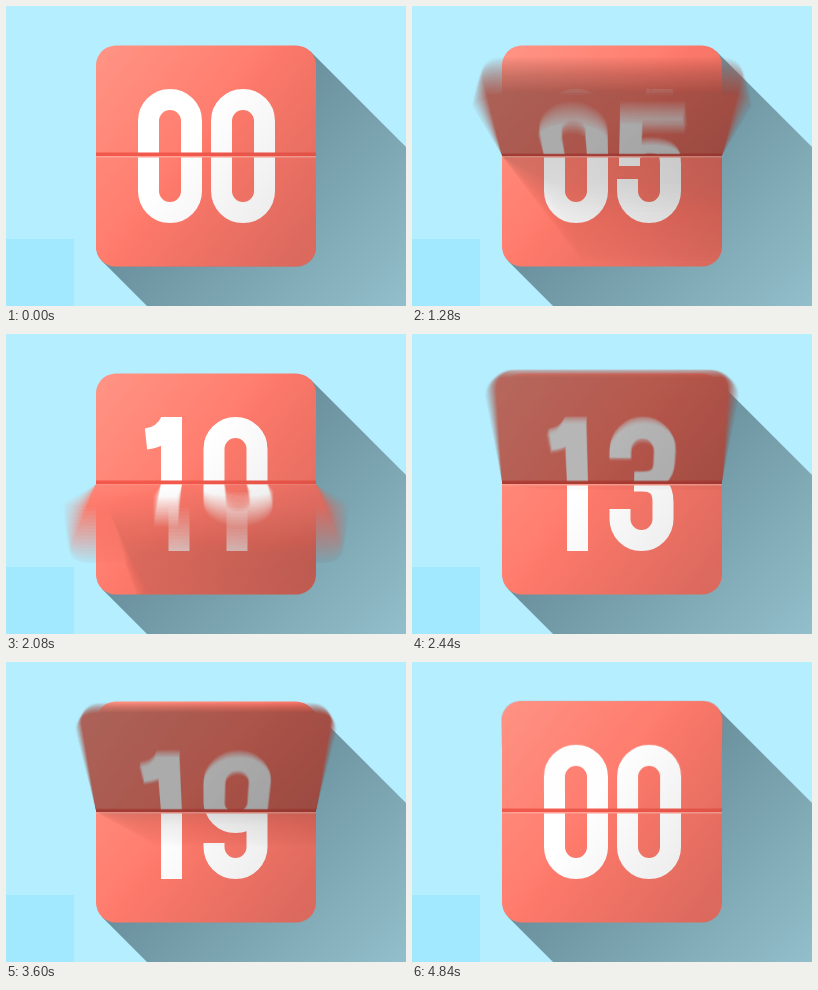
These frames come from a looping animation (400x300 px, 4920 ms). An HTML page with a canvas:

```html
<!DOCTYPE html>
<html lang="en">
<head>
<meta charset="utf-8">
<title>Flip counter</title>
<style>
  html, body { margin: 0; height: 100%; overflow: hidden; background: #b5eefe; }
  canvas { display: block; width: 400px; height: 300px; }
</style>
</head>
<body>
<canvas id="stage" width="400" height="300"></canvas>
<script>
const LOOP = 4920, STEP = 40, COUNT = 21;
const SHUTTER = 20, SAMPLES = 18;
const HINGE = 150, HALF = 110.5, LEFT = 90, WIDTH = 220;
const PERSPECTIVE = 0.27 / HALF;

// Stroked numerals in a 64 x 134 box, line width 21
const DIGITS = [
  'M10.5 32a21.5 21.5 0 0 1 43 0v70a21.5 21.5 0 0 1-43 0z',
  'M27.5 134V0M2 22Q20 20 27 4',
  'M10.5 42V32a21.5 21.5 0 0 1 43 0c0 34-43 44-43 91.5H62',
  'M10.5 40v-8a21.5 21.5 0 0 1 43 0v12q0 20-20 20h-9M25 64h8q20.5 0 20.5 21v17a21.5 21.5 0 0 1-43 0v-10',
  'M45.5 134V0M40 3L11 88v11.5h55',
  'M60 10.5H12.5V77M14 66q4-14 18-14q21.5 0 21.5 23v27a21.5 21.5 0 0 1-43 0v-12',
  'M53.5 36v-4a21.5 21.5 0 0 0-43 0v70a21.5 21.5 0 0 0 43 0v-24a21.5 21.5 0 0 0-43 0',
  'M1 10.5H51.5L26 134',
  'M12 32a20 21.5 0 0 1 40 0v12a20 20 0 0 1-40 0zM10.5 86a21.5 22 0 0 1 43 0v16a21.5 21.5 0 0 1-43 0z',
  'M10.5 98v4a21.5 21.5 0 0 0 43 0v-70a21.5 21.5 0 0 0-43 0v24a21.5 21.5 0 0 0 43 0'
].map(d => new Path2D(d));

function layer(paint) {
  const canvas = document.createElement('canvas');
  canvas.width = 400;
  canvas.height = 300;
  const g = canvas.getContext('2d');
  if (paint) paint(g);
  return g;
}

function gradient(g, x0, y0, x1, y1, ...colors) {
  const fill = g.createLinearGradient(x0, y0, x1, y1);
  colors.forEach((c, i) => fill.addColorStop(i / (colors.length - 1), c));
  return fill;
}

function cardPath(g) {
  g.beginPath();
  g.roundRect(LEFT, HINGE - HALF, WIDTH, 2 * HALF, 20);
}

const backdrop = layer(g => {
  g.fillStyle = '#b5eefe';
  g.fillRect(0, 0, 400, 300);
  g.fillStyle = gradient(g, 185, 185, 350, 350, '#6b929e', '#92bfcb');
  g.beginPath();
  for (const [x, y] of [[304, 45], [403, 144], [403, 303], [144, 303], [96, 255]]) g.lineTo(x, y);
  g.fill();
  g.fillStyle = '#a2e8fe';
  g.fillRect(0, 233, 68, 67);
}).canvas;

const faces = Array.from({ length: COUNT }, (_, n) => layer(g => {
  cardPath(g);
  g.clip();
  g.fillStyle = gradient(g, 95, 55, 310, 225, '#ff9283', '#ff7a6b', '#f47568');
  g.fillRect(0, 0, 400, 300);

  const digits = [Math.floor(n / 10), n % 10];
  const cell = d => d === 1 ? 58 : 73;
  let x = 200.5 - (cell(digits[0]) + cell(digits[1])) / 2;
  g.strokeStyle = '#fff';
  g.lineWidth = 21;
  for (const d of digits) {
    g.save();
    g.translate(x + (d === 1 ? 3 : 4.5), 83);
    g.stroke(DIGITS[d]);
    g.restore();
    x += cell(d);
  }
  g.fillStyle = '#f2584c';
  g.fillRect(LEFT, 146.5, WIDTH, 3.5);
  g.fillStyle = '#ffa194';
  g.fillRect(LEFT, HINGE, WIDTH, 1.5);

  // Light falls off towards the lower right
  g.fillStyle = gradient(g, 185, 130, 315, 225, 'rgba(0,0,0,0)', 'rgba(0,0,0,.1)');
  g.fillRect(0, 0, 400, 300);
}).canvas);

const scene = layer(), flap = layer();
const stage = document.getElementById('stage').getContext('2d');

function ease(x) {
  let lo = 0, hi = 1, u;
  for (let i = 0; i < 30; i++) {
    u = (lo + hi) / 2;
    const v = 1 - u;
    if (3 * u * v * v * 0.303 + 3 * u * u * v * 0.5 + u ** 3 < x) lo = u; else hi = u;
  }
  return u * u * (3 - 2 * u);
}

const counter = t => COUNT * ease(Math.min(1, Math.max(0, t / LOOP)));

function drawHalf(face, y) {
  scene.drawImage(face, 0, y, 400, HINGE, 0, y, 400, HINGE);
}

function drawShadow(angle) {
  const height = HALF * Math.sin(angle);
  const tip = HINGE - HALF * Math.cos(angle) + 1.5 * height;
  if (tip <= HINGE) return;
  scene.save();
  cardPath(scene);
  scene.clip();
  scene.beginPath();
  scene.rect(0, HINGE, 400, HINGE);
  scene.clip();
  scene.fillStyle = gradient(scene, 0, HINGE, 0, tip, 'rgba(0,0,0,.17)', 'rgba(0,0,0,.13)', 'rgba(0,0,0,.05)');
  scene.beginPath();
  scene.moveTo(LEFT, HINGE);
  scene.lineTo(LEFT + height * 0.8, tip);
  scene.lineTo(400, tip);
  scene.lineTo(400, HINGE);
  scene.fill();
  scene.restore();
}

function shade(angle) {
  const x = Math.min(1, angle / 0.5);
  return 0.33 * x * x * (3 - 2 * x);
}

// Projects the turning half card row by row
function drawFlap(face, angle) {
  const up = angle < Math.PI / 2;
  const sin = Math.sin(angle), cos = Math.abs(Math.cos(angle));
  const reach = HALF * cos / (1 - PERSPECTIVE * sin * HALF);

  flap.globalCompositeOperation = 'copy';
  flap.drawImage(face, 0, 0);
  flap.globalCompositeOperation = 'source-atop';
  flap.fillStyle = `rgba(0,0,0,${up ? shade(angle) : 0})`;
  flap.fillRect(0, 0, 400, 300);

  const radius = d => d / (cos + d * PERSPECTIVE * sin);
  for (let d = 0; d < reach; d++) {
    const end = Math.min(d + 1, reach);
    const r0 = radius(d), r1 = radius(end);
    const k = 1 / (1 - PERSPECTIVE * sin * (r0 + r1) / 2);
    scene.drawImage(flap.canvas,
      LEFT, up ? HINGE - r1 : HINGE + r0, WIDTH, r1 - r0,
      200 - WIDTH / 2 * k, up ? HINGE - end : HINGE + d, WIDTH * k, end - d);
  }
}

function drawScene(value) {
  const n = Math.floor(value);
  const angle = Math.PI * (1 - value + n);
  const current = faces[n % COUNT], next = faces[(n + 1) % COUNT];
  scene.drawImage(backdrop, 0, 0);
  drawHalf(current, 0);
  drawHalf(next, HINGE);
  drawShadow(angle);
  drawFlap(angle < Math.PI / 2 ? next : current, angle);
}

// Averages several moments within the shutter time
function render(t) {
  for (let i = 0; i < SAMPLES; i++) {
    drawScene(counter(t + SHUTTER * ((i + 0.5) / SAMPLES - 0.5)));
    stage.globalAlpha = 1 / (i + 1);
    stage.drawImage(scene.canvas, 0, 0);
  }
}

let shown = -1;
const start = performance.now();
function tick() {
  const elapsed = (performance.now() - start) % LOOP;
  const t = Math.min(Math.floor(elapsed / STEP) * STEP, LOOP - 2 * STEP);
  if (t !== shown) render(shown = t);
  requestAnimationFrame(tick);
}
tick();
</script>
</body>
</html>
```
